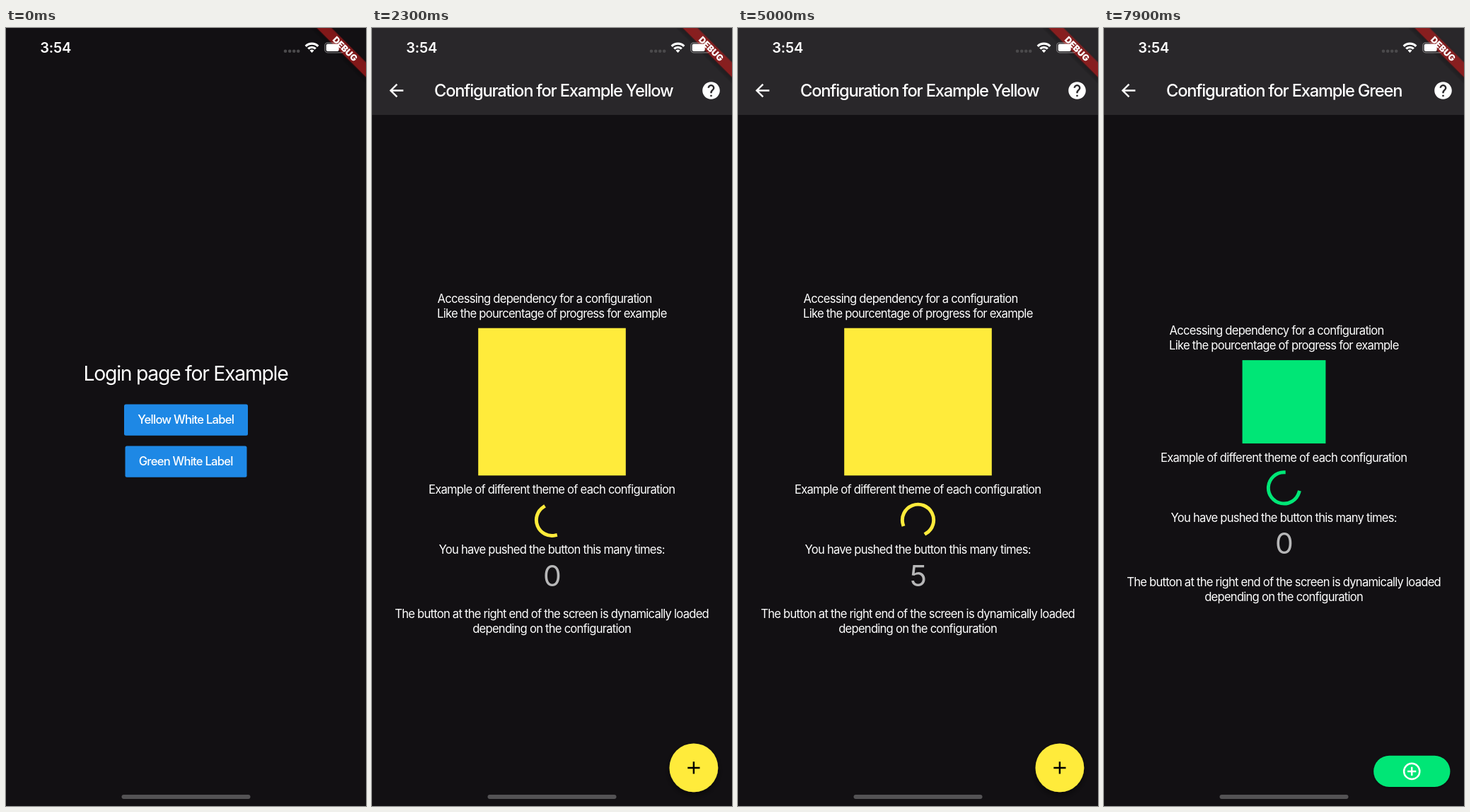
These frames come from a looping animation (509 by 1101 pixels, 8000 ms). An HTML page:

```html
<!DOCTYPE html>
<html lang="en">
<head>
<meta charset="utf-8">
<title>White label demo</title>
<style>
  html, body { margin: 0; width: 100%; height: 100%; overflow: hidden; background: #121013; }
  svg { display: block; width: 100%; height: 100%; }
  text { font-family: Inter, "Open Sans", sans-serif; font-size: 16.6px; letter-spacing: -.0455em; fill: #fff; }
  .mid { text-anchor: middle; }
  .medium { font-weight: 500; }
  .button { fill: #1e88e5; }
</style>
</head>
<body>
<svg viewBox="0 0 509 1101" preserveAspectRatio="xMidYMid meet">
  <defs>
    <filter id="shadow" x="-30%" y="-30%" width="160%" height="170%">
      <feDropShadow dx="0" dy="4" stdDeviation="4" flood-color="#000" flood-opacity=".5"/>
    </filter>
    <filter id="lowShadow" x="-10%" y="-20%" width="120%" height="150%">
      <feDropShadow dx="0" dy="2" stdDeviation="1.5" flood-color="#000" flood-opacity=".4"/>
    </filter>
    <clipPath id="barClip"><rect width="509" height="123"/></clipPath>
    <clipPath id="yellowClip"><rect x="167" y="532.5" width="175" height="44.3" rx="2.5"/></clipPath>
    <clipPath id="greenClip"><rect x="168.5" y="591.5" width="172" height="44.3" rx="2.5"/></clipPath>
  </defs>
  <rect width="509" height="1101" fill="#121013"/>

  <g id="login">
    <text class="mid" x="254" y="498.5" style="font-size:28.4px">Login page for Example</text>
    <rect class="button" x="167" y="532.5" width="175" height="44.3" rx="2.5"/>
    <rect class="button" x="168.5" y="591.5" width="172" height="44.3" rx="2.5"/>
    <g clip-path="url(#yellowClip)"><circle id="yellowSplash" cx="254.5" cy="555" fill="#fff"/></g>
    <g clip-path="url(#greenClip)"><circle id="greenSplash" cx="254.5" cy="614" fill="#fff"/></g>
    <text class="mid medium" x="254.2" y="560.3">Yellow White Label</text>
    <text class="mid medium" x="254.2" y="619.3">Green White Label</text>
  </g>

  <g id="config">
    <rect width="509" height="123" fill="#29272a"/>
    <g clip-path="url(#barClip)"><circle id="backSplash" cx="34.5" cy="88.5" fill="#3a383b"/></g>
    <path fill="#fff" transform="translate(19.75 73.75) scale(1.2292)" d="M20 11H7.83l5.59-5.59L12 4l-8 8 8 8 1.41-1.41L7.83 13H20z"/>
    <path fill="#fff" transform="translate(464.75 73.75) scale(1.2292)" d="M12 2C6.48 2 2 6.48 2 12s4.48 10 10 10 10-4.48 10-10S17.52 2 12 2zm1 17h-2v-2h2v2zm2.07-7.75l-.9.92C13.45 12.9 13 13.5 13 15h-2v-.5c0-1.1.45-2.1 1.17-2.83l1.24-1.26c.37-.36.59-.86.59-1.41 0-1.1-.9-2-2-2s-2 .9-2 2H8c0-2.21 1.79-4 4-4s4 1.79 4 4c0 .88-.36 1.68-.93 2.25z"/>
    <text id="title" class="medium" x="88" y="97.3" style="font-size:23.7px;letter-spacing:-.051em"></text>

    <g id="above">
      <text x="92.6" y="-35.7">Accessing dependency for a configuration</text>
      <text x="92.1" y="-14.7">Like the pourcentage of progress for example</text>
    </g>
    <rect id="square"/>
    <g id="below">
      <text class="mid" x="254.1" y="26">Example of different theme of each configuration</text>
      <path id="spinner" transform="translate(254.5 63)" fill="none" stroke-width="4.92" stroke-linecap="square"/>
      <text class="mid" x="254.1" y="111">You have pushed the button this many times:</text>
      <text id="counter" class="mid" x="254" y="156.5" style="font-size:40.8px;fill:#b7b7b8"></text>
      <text class="mid" x="254.1" y="202">The button at the right end of the screen is dynamically loaded</text>
      <text class="mid" x="254.1" y="223">depending on the configuration</text>
    </g>

    <g id="yellowFab">
      <circle cx="454.9" cy="1046.9" r="34.4" fill="#ffeb3b" filter="url(#shadow)"/>
      <circle id="fabSplash" cx="454.9" cy="1046.9" fill="#ccc"/>
      <path d="M446.3 1046.9h17.2M454.9 1038.3v17.2" stroke="#000" stroke-width="2.46"/>
    </g>
    <g id="greenFab">
      <rect x="381.2" y="1029.8" width="108.2" height="44.25" rx="22.1" fill="#00e676" filter="url(#lowShadow)"/>
      <circle cx="435.2" cy="1051.9" r="11.1" fill="none" stroke="#fff" stroke-width="2.46"/>
      <path d="M429.1 1051.9h12.2M435.2 1045.8v12.2" stroke="#fff" stroke-width="2.46"/>
    </g>
  </g>

  <g transform="translate(509 0) rotate(45)">
    <rect x="-60" y="34.4" width="120" height="14.75" fill="#b71c1c" fill-opacity=".627" filter="url(#shadow)"/>
    <text class="mid" y="46.3" style="font-size:12.5px;font-weight:900;letter-spacing:0">DEBUG</text>
  </g>

  <text x="48.3" y="35" style="font-size:20px;font-weight:600;letter-spacing:-.01em">3:54</text>
  <g fill="#4b4a4c">
    <circle cx="395" cy="32.7" r="2.3"/><circle cx="401.2" cy="32.7" r="2.3"/>
    <circle cx="407.2" cy="32.7" r="2.3"/><circle cx="413.2" cy="32.7" r="2.3"/>
  </g>
  <g fill="none" stroke="#fff" stroke-width="3.2">
    <path d="M423.7 25.8a12.4 12.4 0 0 1 17.6 0M427.2 29.4a7.6 7.6 0 0 1 10.6 0"/>
    <path d="M432.5 35l-3-3.2a4.4 4.4 0 0 1 6 0z" fill="#fff" stroke="none"/>
  </g>
  <rect x="450.8" y="20.8" width="27.5" height="14" rx="4" fill="none" stroke="#fff" stroke-opacity=".4" stroke-width="1.2"/>
  <rect x="452.7" y="22.6" width="18" height="10.4" rx="2.2" fill="#fff"/>
  <rect x="163.5" y="1085" width="182" height="6" rx="3" fill="#535254"/>
</svg>

<script>
  const LOOP = 8000, STEP = 100;
  const SPEED = 4 / 3;
  const YELLOW = { name: 'Yellow', color: '#ffeb3b', tapped: 500, opened: 643, closed: 6100 };
  const GREEN = { name: 'Green', color: '#00e676', tapped: 7400, opened: 7552, closed: LOOP };
  const PUSHES = [3200, 3500, 3800, 4100, 4600];
  const BACK_PRESSED = 5900;
  const CENTER_Y = 529, FULL_SIZE = 208.6, GROW_MS = 679;

  const $ = id => document.getElementById(id);
  const set = (id, attrs) => {
    for (const key in attrs) $(id).setAttribute(key, attrs[key]);
  };
  const show = (id, visible) => set(id, { display: visible ? 'inline' : 'none' });
  const clamp = x => Math.min(1, Math.max(0, x));

  // cubic-bezier(.4, 0, .2, 1)
  function fastOutSlowIn(x) {
    if (x <= 0 || x >= 1) return clamp(x);
    let low = 0, high = 1;
    for (let i = 0; i < 24; i++) {
      const s = (low + high) / 2, r = 1 - s;
      if (1.2 * r * r * s + .6 * r * s * s + s ** 3 < x) low = s; else high = s;
    }
    return low * low * (3 - 2 * low);
  }

  function spinnerPath(ms) {
    const cycle = ms / 1333 % 1, turn = ms / 2222 % 1;
    const head = fastOutSlowIn(cycle * 2), tail = fastOutSlowIn(cycle * 2 - 1);
    const start = Math.PI * (-.5 + 1.5 * tail + 2 * turn + .5 * cycle);
    const sweep = Math.max(1.5 * Math.PI * (head - tail), .001);
    const r = 22.13;
    const point = a => `${(r * Math.cos(a)).toFixed(3)} ${(r * Math.sin(a)).toFixed(3)}`;
    return `M${point(start)}A${r} ${r} 0 ${+(sweep > Math.PI)} 1 ${point(start + sweep)}`;
  }

  function drawConfig(theme, time) {
    const isYellow = theme === YELLOW;
    const age = (time - theme.opened) * SPEED;
    const size = FULL_SIZE * clamp(age / GROW_MS) ** 1.5;
    const top = CENTER_Y - size / 2;

    $('title').textContent = `Configuration for Example ${theme.name}`;
    $('counter').textContent = PUSHES.filter(p => isYellow && time >= p).length;
    set('square', { x: 254.5 - size / 2, y: top, width: size, height: size, fill: theme.color });
    set('above', { transform: `translate(0 ${top})` });
    set('below', { transform: `translate(0 ${top + size})` });
    set('spinner', { d: spinnerPath(age), stroke: theme.color });
    show('yellowFab', isYellow);
    show('greenFab', !isYellow);

    const push = PUSHES.find(p => time >= p - 100 && time < p + 200);
    const since = push === undefined ? -1 : time - push + 100;
    set('fabSplash', {
      r: since < 0 ? 0 : 34.4 * clamp(.45 + since / 300),
      opacity: since > 200 ? .09 : .18
    });
    show('backSplash', isYellow && time >= BACK_PRESSED);
    set('backSplash', { r: 43 * clamp(.55 + (time - BACK_PRESSED) / 200) });
  }

  function drawLogin(time) {
    for (const theme of [YELLOW, GREEN]) {
      const since = time - theme.tapped;
      set(theme.name.toLowerCase() + 'Splash', {
        r: since > 0 && since < 200 ? 60 : 0, opacity: .14
      });
    }
  }

  function draw(now) {
    const time = Math.floor(now % LOOP / STEP) * STEP;
    const theme = [YELLOW, GREEN].find(t => time >= t.opened && time < t.closed);
    show('login', !theme);
    show('config', !!theme);
    if (theme) drawConfig(theme, time); else drawLogin(time);
  }

  function tick() {
    draw(performance.now());
    requestAnimationFrame(tick);
  }
  tick();
</script>
</body>
</html>
```
